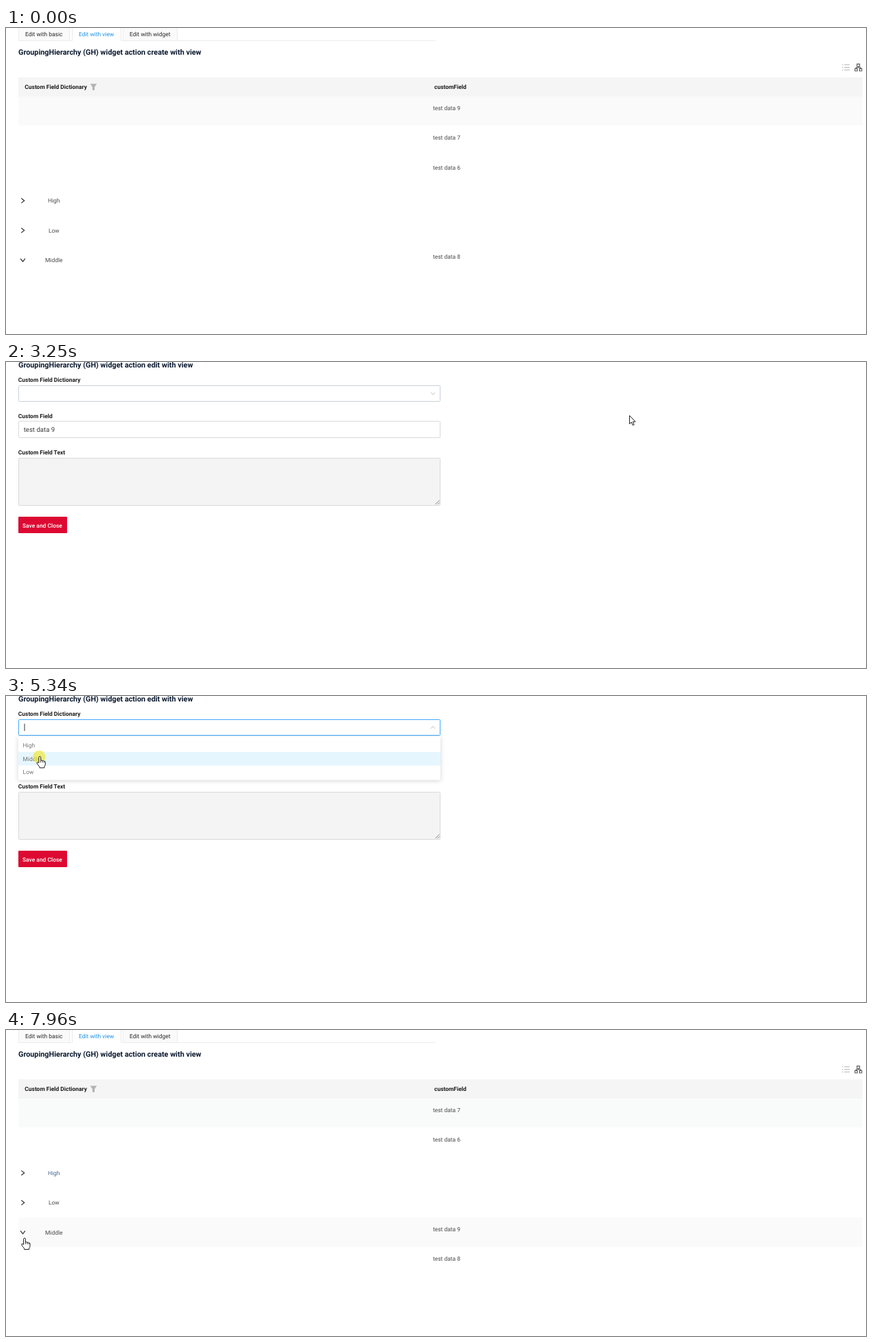
These frames come from a looping animation (1253 by 447 pixels, 7990 ms). An HTML page:

```html
<!DOCTYPE html>
<html lang="en">
<head>
<meta charset="utf-8">
<title>Edit with view</title>
<style>
html, body { margin: 0; width: 100%; height: 100%; overflow: hidden; background: #fff; }
svg { display: block; width: 1253px; height: 447px; }
text { font-family: Roboto, "Liberation Sans", sans-serif; text-rendering: geometricPrecision; white-space: pre; }
.pop { filter: drop-shadow(0 1px 3px rgba(0, 0, 0, .18)); }
</style>
</head>
<body>
<svg id="stage" viewBox="0 0 1253 447"></svg>
<script>
const LOOP = 7990;
const ROW = 43.4;
const stage = document.getElementById('stage');

// clickable areas, also used for drawing
const area = (x, y, w, h) => ({ x, y, w, h });
const AREAS = {
  more: area(1229, 109, 18, 17),
  edit: area(1207, 148.8, 33, 18),
  select: area(18.5, 34.5, 614, 23),
  options: area(17.8, 59.3, 615.2, 63.4),
  save: area(18, 226, 71, 24),
  toggle: area(13, 286, 24, 31)
};

const attr = (name, value) => value ? ` ${name}="${value}"` : '';
// y is the middle of the capital letters
const label = (x, y, str, { size = 8.45, weight = 400, fill = '#4a4a4a', id } = {}) =>
  `<text${attr('id', id)} x="${x}" y="${y + size * .356}" font-size="${size}" font-weight="${weight}" fill="${fill}">${str}</text>`;
const bold = (x, y, str) => label(x, y, str, { weight: 700, fill: '#1c1c1c' });
const heading = (y, str) => label(18, y, str, { size: 10.83, weight: 700, fill: '#0c1a30' });
const box = (x, y, w, h, attrs) => `<rect x="${x}" y="${y}" width="${w}" height="${h}" ${attrs}/>`;
const areaBox = (a, attrs) => box(a.x, a.y, a.w, a.h, attrs);
const line = (d, stroke, width = 1, id) =>
  `<path${attr('id', id)} d="${d}" fill="none" stroke="${stroke}" stroke-width="${width}"/>`;
const group = (id, content) => `<g id="${id}">${content}</g>`;

const rowY = i => 117 + ROW * i;
const cell = (i, n) => label(622, rowY(i), 'test data ' + n);

function branch(i, x, name, { open, id, fill } = {}) {
  const y = rowY(i) + 5;
  return `<g transform="translate(24.5 ${y}) rotate(${open ? 90 : 0})">` +
    line('M-2.2-3.4 2.2 0-2.2 3.4', '#2b2b2b', 1.15, id) + '</g>' + label(x, y, name, { fill });
}

function tabs() {
  const tab = (x, w) => box(x + .5, -4.5, w, 23, 'fill="#fafafa" stroke="#ececec"');
  return line('M18 18.5H96.5V0M167.5 0V18.5H626', '#ececec') + tab(18, 74) + tab(170, 79) +
    label(28, 8.5, 'Edit with basic', { fill: '#262626' }) +
    label(106, 8.5, 'Edit with view', { fill: '#1890e8' }) +
    label(180, 8.5, 'Edit with widget', { fill: '#262626' });
}

function toolIcons() {
  const bars = [0, 1, 2].map(i => `M1218 ${53.8 + 3.7 * i}h1.6m1.6 0h8`).join('');
  return line(bars, '#b4b4b4', 1.1) +
    line('M1239.9 52.6h3.8v3.6h-3.8zM1236.9 59.4h3.4v3.3h-3.4zM1243.5 59.4h3.4v3.3h-3.4zM1241.8 56.2v1.6M1238.6 59.4v-1.6h6.6v1.6', '#555', 1.1);
}

function listView() {
  const before = cell(0, 9) + cell(1, 7) + cell(2, 6) +
    branch(3, 61, 'High') + branch(4, 62, 'Low') + branch(5, 57, 'Middle', { open: true }) + cell(5, 8);
  const after = cell(0, 7) + cell(1, 6) +
    branch(2, 61, 'High', { fill: '#46658f' }) + branch(3, 62, 'Low') +
    branch(4, 57, 'Middle', { id: 'toggle' }) + group('children', cell(4, 9) + cell(5, 8));
  return tabs() + heading(34.7, 'GroupingHierarchy (GH) widget action create with view') + toolIcons() +
    box(18, 72, 1230, 28, 'fill="#f5f5f5"') +
    bold(27.3, 85.7, 'Custom Field Dictionary') + bold(624, 85.7, 'customField') +
    '<path d="M122.7 81.6h9.6l-3.2 4.6v4.6h-3.2v-4.6z" fill="#b3b3b3"/>' +
    box(18, 100, 1230, 42.4, 'id="firstRow"') +
    box(18, 0, 1230, 42.9, 'id="hoverRow" fill="#fafafa"') +
    group('before', before) + group('after', after);
}

function moreButton() {
  const dots = [-1, 0, 1].map(i => `<circle cx="${1238.2 + 4.2 * i}" cy="117.6" r=".95"/>`).join('');
  return '<circle cx="1238.2" cy="117.3" r="8" fill="#fff"/>' + group('dots', dots);
}

function actionMenu() {
  return box(1202.5, 127, 43, 43, 'rx="1.5" fill="#fff" class="pop"') +
    areaBox(AREAS.edit, 'id="editHover" fill="#e6f5fd"') +
    label(1209.7, 138.3, 'Actions', { fill: '#959595' }) +
    label(1213.8, 157.3, 'Edit', { fill: '#6c6c6c' });
}

function formView() {
  const frame = 'rx="1" stroke="#d9d9d9"';
  return heading(4, 'GroupingHierarchy (GH) widget action edit with view') +
    bold(17.8, 26, 'Custom Field Dictionary') +
    areaBox(AREAS.select, 'id="select" rx="1" fill="#fff"') +
    label(25.5, 46, 'Middle', { size: 9.6, fill: '#444', id: 'value' }) +
    line('M27 40.5V51', '#333', 1, 'caret') +
    line('M-3-1.6 0 1.7 3-1.6', '#bdbdbd', 1, 'arrow') +
    bold(17.8, 78.6, 'Custom Field') + box(18.5, 86.5, 614, 24, frame + ' fill="#fff"') +
    label(25.7, 99, 'test data 9', { size: 9.6, fill: '#3c3c3c' }) +
    bold(17.8, 131.5, 'Custom Field Text') + box(18.5, 140.5, 614, 69, frame + ' fill="#f4f4f4"') +
    line('M625.5 208 631.5 202M628.8 208 631.5 205.3', '#777', .9) +
    areaBox(AREAS.save, 'rx="1" fill="#dd0932"') +
    label(24, 239.2, 'Save and Close', { weight: 500, fill: '#fff' });
}

function dropdown() {
  return areaBox(AREAS.options, 'rx="1" fill="#fff" class="pop"') +
    box(17.8, 0, 615.2, 19.8, 'id="optionHover" fill="#e6f6fe"') +
    ['High', 'Middle', 'Low'].map((s, i) => label(24.6, 72 + 19.6 * i, s, { fill: '#747474' })).join('');
}

const spinnerDots = [0, 90, 180, 270]
  .map(a => `<circle cx="-4.8" r="2.3" fill="#bfdbf2" transform="rotate(${a})"/>`).join('');

function cursor() {
  const shape = d => `<path d="${d}" fill="#fff" stroke="#111" stroke-width=".95" stroke-linejoin="round"/>`;
  return '<circle id="press" cx="-1" cy=".5" r="9.3" fill="#f0e832" opacity=".68"/>' +
    group('pointer', shape('M0 0V12.2L2.8 9.7 4.7 14.2 6.7 13.3 4.8 9H8.6Z')) +
    group('hand', shape('M-1.4 9.4V1.3Q-1.3 0 0 0T1.4 1.3V6Q2.8 5 4 6.4Q5.4 5.5 6.3 7Q7.8 6.5 8 8.2V11.6Q7.8 13.8 6.6 15V16.6H-.4V15.2Q-2.6 12.6-4.3 9.8Q-4.3 8-2.8 8.5Z') +
      line('M1.4 6V9M4 6.4V9M6.3 7V9.2', '#111', .8));
}

stage.innerHTML =
  group('list', listView()) + group('more', moreButton()) + group('menu', actionMenu()) +
  group('form', formView()) + group('options', dropdown()) + group('spinner', spinnerDots) +
  group('cursor', cursor());

const el = {};
stage.querySelectorAll('[id]').forEach(node => el[node.id] = node);

// the pointer rests between moves; bow bends a move sideways
const moves = [
  { from: 30, to: 340, x: 1193, y: 125 },
  { from: 500, to: 1130, x: 1227.5, y: 131, bow: [25, -128] },
  { from: 1370, to: 1560, x: 1237, y: 119.5 },
  { from: 2100, to: 2390, x: 1220.5, y: 158.5 },
  { from: 2920, to: 3900, x: 43.8, y: 51, bow: [0, -70] },
  { from: 5010, to: 5290, x: 49.3, y: 88.3 },
  { from: 5480, to: 5790, x: 51.4, y: 240.5, bow: [-40, 0] },
  { from: 6640, to: 7410, x: 27, y: 304, bow: [110, -65] }
];
const clicks = { more: 1600, edit: 2600, select: 4180, option: 5300, save: 5840, branch: 7470 };
const PRESS = 180;
const menuAt = clicks.more + 160;
const formAt = clicks.edit + 300;
const openAt = clicks.select + 160;
const pickAt = clicks.option + 190;
const spinAt = clicks.save + 180;
const listAt = clicks.save + 640;
const expandAt = clicks.branch + 400;

const ramp = (t, start, span) => Math.max(0, Math.min(1, (t - start) / span));
const ease = k => k * k * (3 - 2 * k);
const show = (node, on) => node.setAttribute('display', on ? 'inline' : 'none');

function pointerAt(t) {
  let x = 325, y = 462;
  for (const { from, to, x: endX, y: endY, bow = [0, 0] } of moves) {
    if (t < from) break;
    const k = ease(ramp(t, from, to - from));
    const bend = Math.sin(Math.PI * k);
    x += (endX - x) * k + bow[0] * bend;
    y += (endY - y) * k + bow[1] * bend;
  }
  return [x, y];
}

function overClickable(t, x, y) {
  const { more, edit, select, options, save, toggle } = AREAS;
  const active = t < formAt ? [more, edit] : t >= listAt ? [toggle] :
    t >= openAt && t < pickAt ? [select, options, save] : [select, save];
  return active.some(a => x >= a.x && x <= a.x + a.w && y >= a.y && y <= a.y + a.h);
}

function drawList(t, y) {
  const saved = t >= listAt;
  show(el.before, !saved);
  show(el.after, saved);
  el.firstRow.setAttribute('fill', saved ? '#f9fbfa' : '#fafafa');
  const row = Math.floor((y - 100) / ROW);
  show(el.hoverRow, saved && row > 0);
  el.hoverRow.setAttribute('y', 100 + ROW * row);
  show(el.children, t >= expandAt + 30);
  el.toggle.setAttribute('transform', `rotate(${90 * ramp(t, expandAt, 80)})`);
  show(el.more, t >= 310 && t < formAt);
  el.dots.setAttribute('fill', t < menuAt ? '#444' : '#999');
  show(el.menu, t >= menuAt && t < formAt);
  el.menu.setAttribute('opacity', ramp(t, menuAt, 140));
  show(el.editHover, y > AREAS.edit.y);
}

function drawForm(t, y) {
  const open = t >= openAt && t < pickAt;
  const picked = t >= pickAt;
  el.select.setAttribute('stroke', open ? '#40a9ff' : picked ? '#bcd3e4' : '#c9d1d8');
  show(el.value, picked);
  show(el.caret, open);
  el.arrow.setAttribute('transform', `translate(622 46) scale(1 ${open ? -1 : 1})`);
  show(el.options, open);
  el.options.setAttribute('opacity', ramp(t, openAt, 160));
  el.optionHover.setAttribute('y', y > 78 ? 81.7 : 62.1);
  show(el.spinner, t >= spinAt && t < listAt);
  el.spinner.setAttribute('transform', `translate(632.8 122.8) rotate(${8 + (t - spinAt - 200) * .3})`);
}

function draw(t) {
  const [x, y] = pointerAt(t);
  const onForm = t >= formAt && t < listAt;
  show(el.list, !onForm);
  show(el.form, onForm);
  drawList(t, y);
  drawForm(t, y);
  const hand = overClickable(t, x, y);
  show(el.hand, hand);
  show(el.pointer, !hand);
  show(el.press, Object.values(clicks).some(c => t >= c && t < c + PRESS));
  el.cursor.setAttribute('transform', `translate(${x} ${y})`);
}

function tick() {
  draw(performance.now() % LOOP);
  requestAnimationFrame(tick);
}
tick();
</script>
</body>
</html>
```
